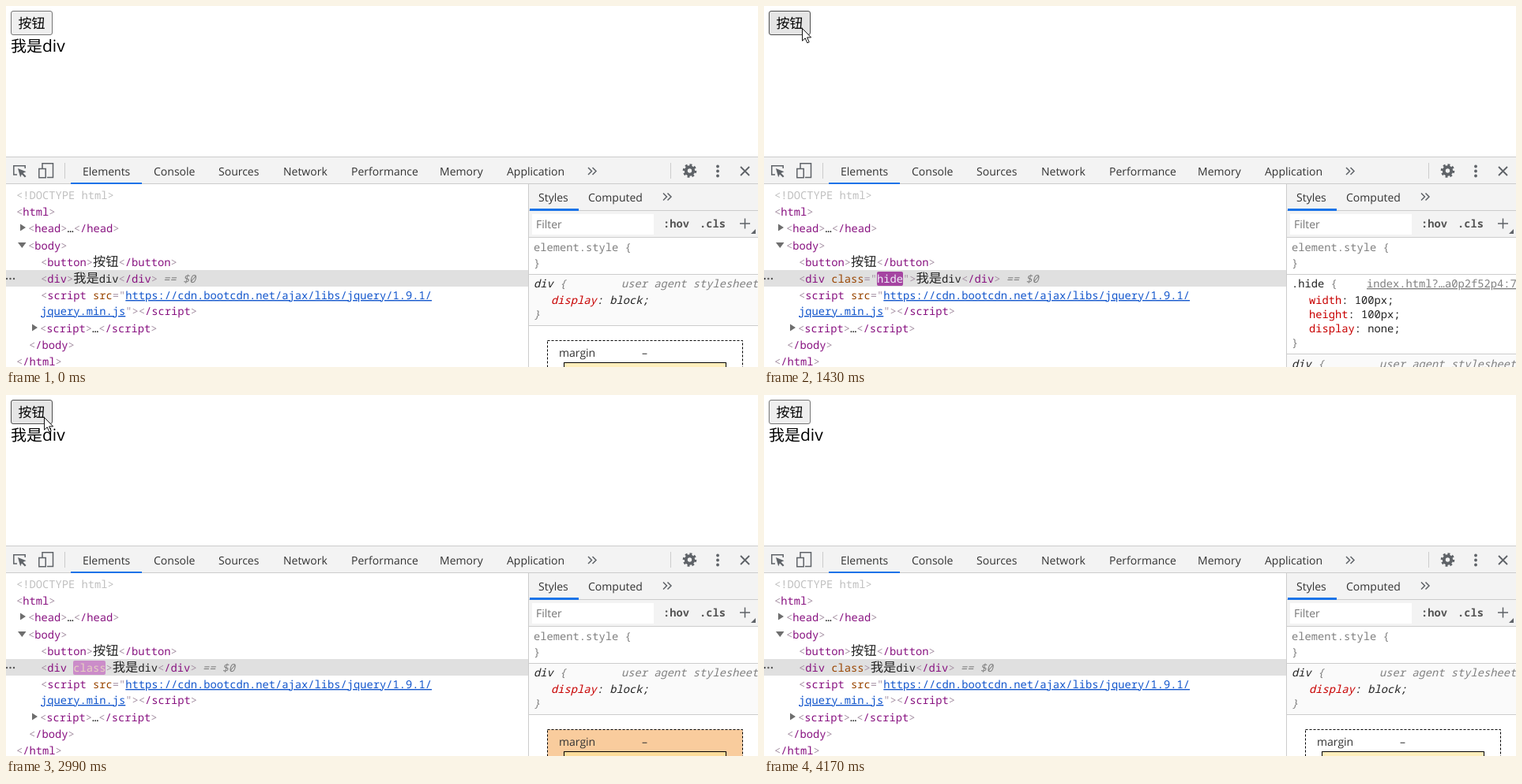
An HTML page for the animation above (4.92 s loop, 952 by 458 pixels).

```html
<!DOCTYPE html>
<html lang="zh">
<head>
<meta charset="utf-8">
<style>
  html, body { margin: 0; width: 100%; height: 100%; overflow: hidden; background: #fff; }
  svg { display: block; width: 952px; height: 458px; }
  text { white-space: pre; text-rendering: geometricPrecision; }
  .ui { font: 14px "Open Sans", "Noto Sans", sans-serif; fill: #333; }
  .code { font: 13.75px "Noto Sans Mono", "DejaVu Sans Mono", monospace; fill: #222; }
  .zh { font-family: "Noto Sans CJK SC", "Noto Sans CJK JP", "Noto Sans CJK", sans-serif; font-style: normal; }
  .code .zh { font-size: 16.25px; }
  .bold { font-weight: bold; fill: #555; }
  .p { fill: #a894a6; }
  .t { fill: #881280; }
  .a { fill: #994500; }
  .v { fill: #1a1aa6; }
  .u { fill: #1155cc; text-decoration: underline; }
  .g { fill: #808080; }
  .r { fill: #c80000; }
  .i { font-style: italic; }
  .line { stroke: #ccc; fill: none; }
  .icon { stroke: #5f6368; stroke-width: 1.5; fill: none; }
  .solid { fill: #5f6368; }
</style>
</head>
<body>
<svg viewBox="0 0 952 458">
  <rect width="952" height="458" fill="#fff"/>

  <!-- page -->
  <rect id="button" x="6.5" y="6.5" width="52" height="30" rx="2.5"/>
  <text class="zh" x="15.5" y="28" font-size="17">按钮</text>
  <g id="pageDiv">
    <text class="zh" x="6" y="58" font-size="20">我是</text>
    <text class="ui" x="46" y="58" style="font-size:21px;fill:#000">div</text>
  </g>

  <!-- main toolbar -->
  <rect y="191" width="952" height="35" fill="#f3f3f3"/>
  <path class="line" d="M0 191.5H952M0 225.5H952M74.5 199V219M841.5 199V219"/>
  <rect x="82" y="224" width="90" height="2" fill="#1a73e8"/>
  <g class="icon">
    <path d="M14 214H9.8V202.8H24.2V206"/>
    <path d="M46 206V199.8H59.5V217.5H52M41.8 206.5H50.2V217.8H41.8z"/>
    <path d="M737 205l4.5 4.5-4.5 4.5M742.5 205l4.5 4.5-4.5 4.5"/>
    <path d="M930 204l11 11M941 204l-11 11" stroke-width="1.8"/>
    <circle cx="865.5" cy="209" r="4.7" stroke-width="4"/>
    <circle cx="865.5" cy="209" r="7.4" stroke-width="2.8" pathLength="16" stroke-dasharray="1"/>
  </g>
  <path class="solid" d="M15 206l10.5 4.2-4 1.7 4 4-1.6 1.6-4-4-1.7 3.7z"/>
  <g class="solid"><circle cx="901" cy="203.5" r="1.9"/><circle cx="901" cy="209.5" r="1.9"/><circle cx="901" cy="215.5" r="1.9"/></g>
  <g id="tabs" class="ui"></g>

  <!-- element tree -->
  <rect id="hover" y="357" width="658" height="40" rx="5" fill="#eaf0fb"/>
  <rect y="335" width="661" height="21" fill="#e0e0e0"/>
  <g fill="#555"><circle cx="1" cy="346" r="1.2"/><circle cx="5.5" cy="346" r="1.2"/><circle cx="10" cy="346" r="1.2"/></g>
  <path fill="#6e6e6e" d="M18 276.5l7 4.5-7 4.5zM15 300h10.5l-5.2 7zM33 403.5l7 4.5-7 4.5z"/>
  <rect id="flash" y="337" height="18" rx="2"/>
  <g id="tree" class="code"></g>
  <text id="divLine" class="code" x="44" y="351"></text>

  <!-- styles pane -->
  <rect x="662" y="226" width="290" height="68" fill="#f3f3f3"/>
  <rect x="666" y="264" width="154" height="26" fill="#fff"/>
  <path class="line" d="M661.5 226V458M662 259.5H952M662 293.5H952M662 340.5H952"/>
  <rect x="663" y="257" width="62" height="3" fill="#1a73e8"/>
  <path class="icon" d="M832 237.5l4.5 4.5-4.5 4.5M837.5 237.5l4.5 4.5-4.5 4.5M929 276H942M935.5 269.5V282.5"/>
  <path class="solid" d="M949 283v6h-6z"/>
  <g class="ui">
    <text x="674" y="248">Styles</text>
    <text x="737" y="248">Computed</text>
    <text x="671" y="282" style="fill:#757575">Filter</text>
  </g>
  <g class="code bold">
    <text x="832" y="281">:hov</text>
    <text x="878" y="281">.cls</text>
  </g>
  <g class="code g">
    <text x="668" y="311">element.style {</text>
    <text x="668" y="331">}</text>
  </g>
  <g id="agentRule">
    <rect x="662" y="341" width="290" height="64" fill="#fafafa"/>
    <path class="line" d="M662 405.5H952"/>
    <g class="code i">
      <text x="668" y="357">div <tspan class="g">{</tspan></text>
      <text class="g" x="779" y="357">user agent stylesheet</text>
      <text x="690" y="378"><tspan class="r">display</tspan>: block;</text>
      <text class="g" x="668" y="396">}</text>
    </g>
    <rect id="margin" x="685.5" y="424.5" width="247" height="60" stroke="#000" stroke-dasharray="3 2"/>
    <rect id="border" x="706.5" y="452.5" width="205" height="40" stroke="#000"/>
    <text class="ui" x="700" y="445">margin</text>
    <text class="ui" x="805" y="445">–</text>
  </g>
  <g id="hideRule" class="code">
    <text x="668" y="357">.hide <tspan class="g">{</tspan></text>
    <text class="g" x="763" y="357" text-decoration="underline">index.html?…a0p2f52p4:7</text>
    <text x="690" y="378"><tspan class="r">width</tspan>: 100px;</text>
    <text x="690" y="396"><tspan class="r">height</tspan>: 100px;</text>
    <text x="690" y="414"><tspan class="r">display</tspan>: none;</text>
    <text class="g" x="668" y="432">}</text>
    <rect x="662" y="442" width="290" height="16" fill="#fafafa"/>
    <path class="line" d="M662 441.5H952"/>
    <g class="i">
      <text x="668" y="459">div <tspan class="g">{</tspan></text>
      <text class="g" x="779" y="459">user agent stylesheet</text>
    </g>
  </g>

  <path id="cursor" d="M.5 .5V16.2L4.2 12.8 6.8 18.8 9.2 17.8 6.6 11.9H11.6z" fill="#fff" stroke="#111"/>
</svg>
<script>
const LOOP = 4920;
const $ = id => document.getElementById(id);
const span = (cls, text) => `<tspan class="${cls}">${text}</tspan>`;
const tag = (name, attrs = "") => span("p", "&lt;") + span("t", name) + attrs + span("p", "&gt;");
const pair = (name, body, attrs) => tag(name, attrs) + body + tag("/" + name);
const quote = span("p", '="');

$("tabs").innerHTML = Object.entries({
  Elements: 97, Console: 187, Sources: 269, Network: 351, Performance: 437, Memory: 549, Application: 634
}).map(([name, x]) => `<text x="${x}" y="215">${name}</text>`).join("");

$("tree").innerHTML = [
  [13, 245, `<tspan fill="#c0c0c0">&lt;!DOCTYPE html&gt;</tspan>`],
  [13, 266, tag("html")],
  [28, 287, pair("head", "…")],
  [28, 309, tag("body")],
  [44, 330, pair("button", span("zh", "按钮"))],
  [44, 372, span("p", "&lt;") + span("t", "script") + span("a", " src") + quote +
    span("u", "https://cdn.bootcdn.net/ajax/libs/jquery/1.9.1/")],
  [44, 392, span("u", "jquery.min.js") + span("p", '"&gt;') + tag("/script")],
  [43, 414, pair("script", "…")],
  [29, 435, tag("/body")],
  [13, 456, tag("/html")]
].map(([x, y, body]) => `<text x="${x}" y="${y}">${body}</text>`).join("");

const attrs = {
  plain: "",
  hide: span("a", " class") + quote + '<tspan id="fresh">hide</tspan>' + span("p", '"'),
  empty: ' <tspan id="fresh">class</tspan>'
};
// Attribute flashes: time span, box and resting text colour.
const flashes = {
  hide: { start: 1350, end: 2440, x: 143, width: 33, color: [26, 26, 166] },
  empty: { start: 2610, end: 4170, x: 85, width: 41, color: [153, 69, 0] }
};

const pointer = [
  [0, 0, -99], [70, 770, 440], [150, 705, 402], [230, 590, 372], [310, 430, 268], [390, 250, 150],
  [470, 112, 66], [550, 62, 32], [660, 55, 30], [740, 48, 28], [3370, 92, 62], [3450, 560, 372],
  [3530, 682, 396], [3600, 738, 438], [3680, 0, -99]
];
const fadeTicks = [
  1430, 1520, 1600, 1660, 1810, 1890, 1970, 2120, 2200, 2440, 2760, 2840, 2910, 2990,
  3140, 3230, 3370, 3450, 3530, 3600, 3680, 3760, 3920, 4000, 4090, 4170
];

const within = (t, a, b) => t >= a && t < b;
const show = (id, on) => $(id).setAttribute("visibility", on ? "visible" : "hidden");
const mix = (a, b, k) => a.map((v, i) => v + (b[i] - v) * k);
const rgb = c => `rgb(${c.map(Math.round)})`;
const paint = (id, fill, stroke) => {
  $(id).setAttribute("fill", fill);
  if (stroke) $(id).setAttribute("stroke", stroke);
};

// cubic-bezier(.25, .1, .25, 1)
function ease(x) {
  let lo = 0, hi = 1, s = x;
  const curve = (a, b) => 3 * a * s * (1 - s) ** 2 + 3 * b * s * s * (1 - s) + s ** 3;
  for (let n = 0; n < 20; n++) {
    s = (lo + hi) / 2;
    if (curve(.25, .25) < x) lo = s; else hi = s;
  }
  return curve(.1, 1);
}

function drawFlash(state, t) {
  const flash = flashes[state];
  const tick = fadeTicks.findLast(v => v <= t);
  const k = flash ? Math.min(1, (tick - flash.start) / (flash.end - flash.start)) : 1;
  show("flash", k < 1);
  if (!flash) return;
  $("fresh").setAttribute("fill", rgb(mix([255, 255, 255], flash.color, k)));
  const pale = [245, 219, 244];
  const back = k < .8
    ? mix([158, 54, 153], pale, ease(k / .8))
    : mix(pale, [224, 224, 224], ease((k - .8) / .2));
  $("flash").setAttribute("x", flash.x);
  $("flash").setAttribute("width", flash.width);
  paint("flash", rgb(back));
}

let shown;
function render(t) {
  const state = t < 1430 ? "plain" : t < 2760 ? "hide" : "empty";
  if (state !== shown) {
    $("divLine").innerHTML = pair("div", span("zh", "我是") + "div", attrs[state]) +
      '<tspan class="g i" dx="7">== $0</tspan>';
    shown = state;
  }
  drawFlash(state, t);
  show("pageDiv", !within(t, 1350, 2680));
  show("hideRule", state === "hide");
  show("agentRule", state !== "hide");
  show("hover", within(t, 230, 310) || within(t, 3450, 3600));

  const pressed = within(t, 1260, 1350) || within(t, 2590, 2680);
  if (pressed) paint("button", "#f5f5f5", "#8d8d8d");
  else if (within(t, 740, 3370)) paint("button", "#e5e5e5", "#4f4f4f");
  else paint("button", "#efefef", "#767676");

  const lit = within(t, 70, 3680);
  paint("margin", lit ? "#f9cc9d" : "#fff");
  paint("border", lit ? "#fddc9a" : "#ffeebb");

  const [, x, y] = pointer.findLast(p => p[0] <= t);
  $("cursor").setAttribute("transform", `translate(${x} ${y})`);
}

const begin = performance.now();
function loop() {
  render((performance.now() - begin) % LOOP);
  requestAnimationFrame(loop);
}
loop();
</script>
</body>
</html>
```
